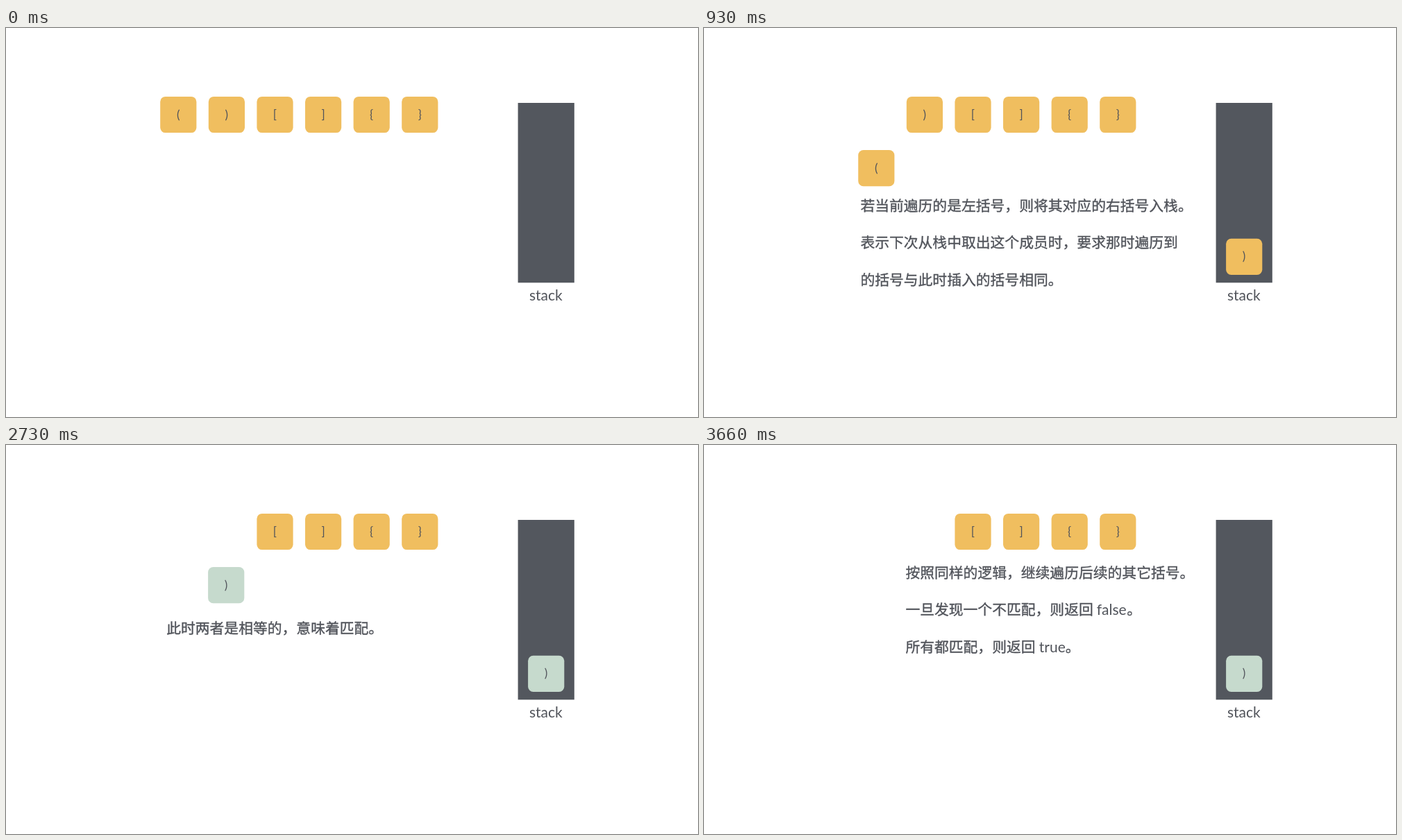
Recreate the animation shown at these times as an HTML page. Size 997 by 561 pixels, loop 4.56 s.

```html
<!DOCTYPE html>
<html lang="zh-CN">
<head>
<meta charset="utf-8">
<title>Bracket matching with a stack</title>
<style>
  html, body { margin: 0; width: 100%; height: 100%; overflow: hidden; background: #fff; }
  svg { display: block; }
  text { fill: #50535a; font-family: Lato, "Noto Sans CJK SC", "Noto Sans CJK", sans-serif; }
  .zh {
    font-size: 20.8px; font-family: "Noto Sans CJK SC", "Noto Sans CJK", sans-serif;
    stroke: #50535a; stroke-width: .35px;
  }
  .en { font-size: 21px; }
  .wide { letter-spacing: .8px; }
  .mark { font-size: 17px; text-anchor: middle; }
</style>
</head>
<body>
<svg width="997" height="561" viewBox="0 0 997 561">
  <rect x="737.6" y="108" width="81.2" height="259.3" fill="#53575e"/>
  <text class="en" x="777.8" y="393" text-anchor="middle">stack</text>
  <g id="scene"></g>
</svg>
<script>
const LOOP = 4560, YELLOW = '#f0be5f', GREEN = '#c6dacd';
const BRACKETS = '()[]{}';
const scene = document.getElementById('scene');

const tile = (mark, x, y, fill = YELLOW) =>
  `<rect x="${x}" y="${y}" width="52.2" height="52.2" rx="7.5" fill="${fill}"/>` +
  `<text class="mark" x="${x + 26}" y="${y + 31.6}">${mark}</text>`;

const text = (kind, x, y, str) => `<text class="${kind}" x="${x}" y="${y}">${str}</text>`;
const zh = (x, y, str) => text('zh', x, y, str);
const en = (x, y, str) => text('en', x, y, str);

// The brackets still waiting in the top row
const queue = first => [...BRACKETS]
  .map((b, i) => i < first ? '' : tile(b, 222.2 + i * 69.6, 98.9)).join('');
const current = (mark, x, fill) => tile(mark, x, 176, fill);
const stacked = fill => tile(')', 752.1, 303.7, fill);

const steps = [
  { at: 0, parts: [queue(0)] },
  { at: 930, parts: [
    queue(1), current('(', 222.2), stacked(),
    zh(225.4, 263.6, '若当前遍历的是左括号，则将其对应的右括号入栈。'),
    zh(225.4, 317.2, '表示下次从栈中取出这个成员时，要求那时遍历到'),
    zh(225.4, 370.8, '的括号与此时插入的括号相同。')
  ] },
  { at: 1830, parts: [
    queue(2), current(')', 291.1), stacked(),
    zh(225.4, 263.6, '若当前遍历的是右括号，则从栈中'),
    text('en wide', 542.6, 263.3, 'pop'),
    zh(586.6, 263.6, '括号，判断'),
    zh(225.4, 317.2, '两者是否相等。'),
    zh(225.4, 370.8, '若相等，意味着匹配，否则意味着不匹配。')
  ] },
  { at: 2730, parts: [
    queue(2), current(')', 291.1, GREEN), stacked(GREEN),
    zh(231.2, 271.8, '此时两者是相等的，意味着匹配。')
  ] },
  { at: 3660, parts: [
    queue(2), stacked(GREEN),
    zh(290.4, 191.8, '按照同样的逻辑，继续遍历后续的其它括号。'),
    zh(290.4, 245.4, '一旦发现一个不匹配，则返回'),
    en(565.8, 245.1, 'false'),
    zh(609.2, 245.4, '。'),
    zh(290.4, 299, '所有都匹配，则返回'),
    en(482.8, 298.7, 'true'),
    zh(520.8, 299, '。')
  ] }
];

let shown;
function draw(ms) {
  const t = ms % LOOP;
  const step = steps.findLast(s => s.at <= t);
  if (step === shown) return;
  shown = step;
  scene.innerHTML = step.parts.join('');
}

const start = performance.now();
function tick() {
  draw(performance.now() - start);
  requestAnimationFrame(tick);
}
tick();
</script>
</body>
</html>
```
